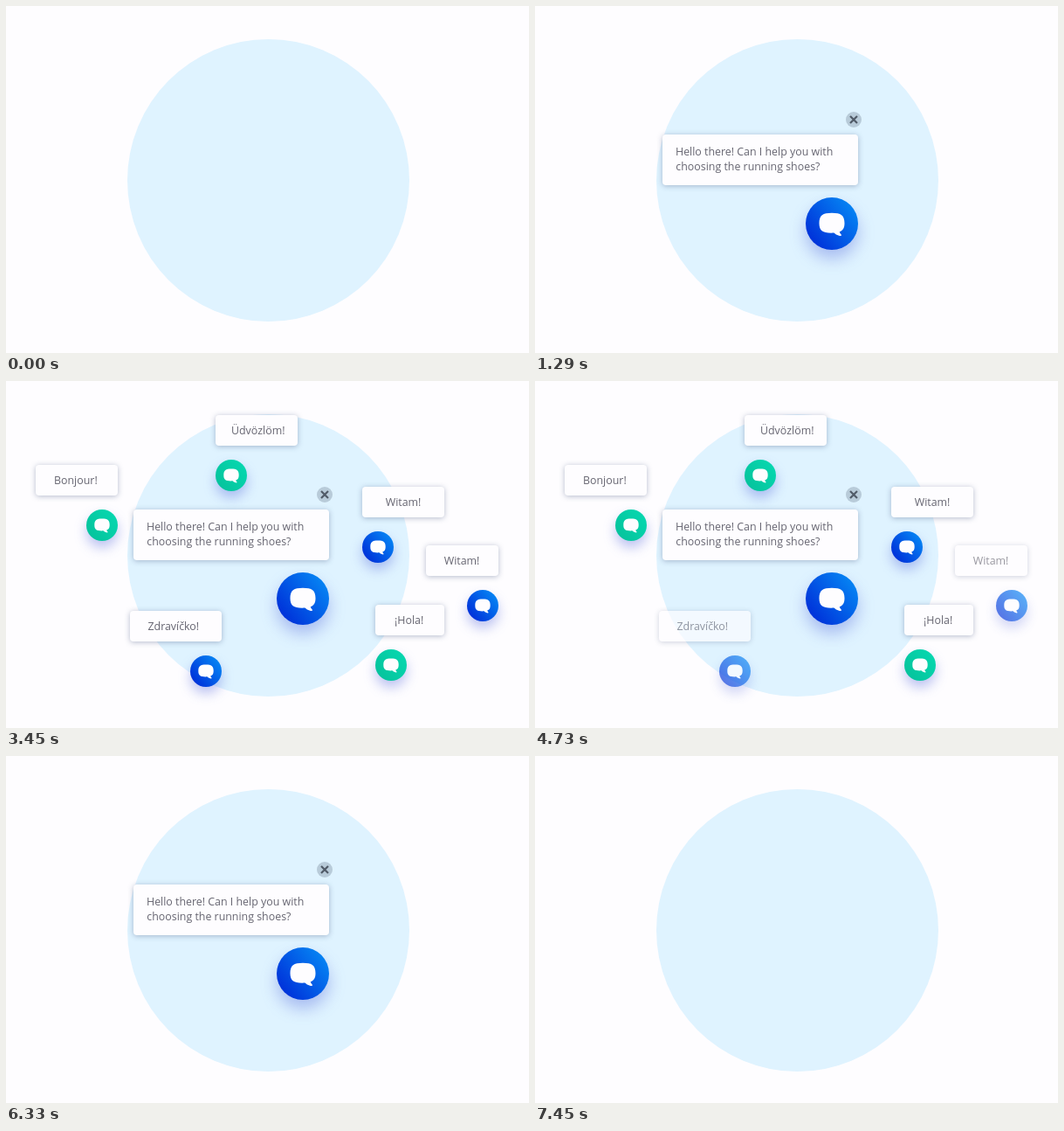
Animation of 599x397 px, one loop 7860 ms. Source, as an HTML page with a canvas:

```html
<!DOCTYPE html>
<html lang="en">
<head>
<meta charset="utf-8">
<title>Chat greetings</title>
<style>
  html, body { margin: 0; width: 100%; height: 100%; overflow: hidden; background: #fefdff; }
  canvas { display: block; }
</style>
</head>
<body>
<canvas id="stage" width="599" height="397"></canvas>
<script>
const LOOP = 7860, STEP = 80, FIRST_STEP = 10, FADE = 500, RISE = 55;
const BLUE = ['#0034da', '#0580f2'];
const GREEN = ['#06c49d', '#06d6ae'];

const stage = document.getElementById('stage');
const view = stage.getContext('2d');
const layer = document.createElement('canvas');
layer.width = stage.width;
layer.height = stage.height;
const ctx = layer.getContext('2d');

// Each greeting: start time, card x, card top, card width, text x, button x, colours
const greetings = [
  { text: 'Bonjour!',   start: 1530, x: 34,  y: 96,  w: 94,  textX: 55,    button: 110, colors: GREEN },
  { text: 'Witam!',     start: 1530, x: 408, y: 121, w: 94,  textX: 434.7, button: 426, colors: BLUE },
  { text: 'Üdvözlöm!',  start: 2170, x: 240, y: 39,  w: 94,  textX: 258,   button: 258, colors: GREEN },
  { text: '¡Hola!',     start: 2170, x: 423, y: 256, w: 79,  textX: 445,   button: 441, colors: GREEN },
  { text: 'Witam!',     start: 2850, x: 481, y: 188, w: 83,  textX: 501.7, button: 546, colors: BLUE },
  { text: 'Zdravíčko!', start: 2850, x: 142, y: 263, w: 105, textX: 162.5, button: 229, colors: BLUE }
];

function disc(c, x, y, r, fill) {
  c.fillStyle = fill;
  c.beginPath();
  c.arc(x, y, r, 0, Math.PI * 2);
  c.fill();
}

function shadow(color, blur, dy) {
  ctx.shadowColor = color;
  ctx.shadowBlur = blur;
  ctx.shadowOffsetY = dy;
}

function card(x, y, w, h) {
  ctx.save();
  shadow('rgba(60, 80, 120, 0.38)', 6, 1);
  ctx.fillStyle = '#fefdff';
  ctx.beginPath();
  ctx.roundRect(x, y, w, h, 4);
  ctx.fill();
  ctx.restore();
}

function label(text, x, y) {
  ctx.font = '12.4px "Open Sans", "Noto Sans", sans-serif';
  ctx.fillStyle = '#666571';
  ctx.fillText(text, x, y);
}

function button(x, y, r, colors) {
  const k = r / 30;
  const gradient = ctx.createLinearGradient(x - r * 0.75, y + r * 0.6, x + r * 0.75, y - r * 0.6);
  colors.forEach((color, i) => gradient.addColorStop(i, color));
  ctx.save();
  shadow('rgba(70, 90, 215, 0.36)', 8 + 10 * k, 4 + 6 * k);
  disc(ctx, x, y, r, gradient);
  ctx.restore();

  ctx.save();
  ctx.translate(x, y);
  ctx.scale(k, k);
  ctx.fillStyle = '#fefdff';
  ctx.beginPath();
  ctx.moveTo(0, -12.3);
  ctx.bezierCurveTo(10.5, -12.3, 14.5, -9.5, 14.5, -0.5);
  ctx.bezierCurveTo(14.5, 5, 12.5, 8, 8.8, 9.3);
  ctx.quadraticCurveTo(9.3, 11.8, 11.2, 13.2);
  ctx.quadraticCurveTo(10.6, 14.4, 8.2, 13.8);
  ctx.quadraticCurveTo(4.5, 12.8, 2.4, 10.6);
  ctx.bezierCurveTo(-10, 11.2, -14.5, 8.5, -14.5, -0.5);
  ctx.bezierCurveTo(-14.5, -9.5, -10.5, -12.3, 0, -12.3);
  ctx.fill();
  ctx.restore();
}

function closeIcon(x, y) {
  disc(ctx, x, y, 9, '#b8cbd9');
  ctx.strokeStyle = '#505a67';
  ctx.lineWidth = 2.2;
  ctx.beginPath();
  for (const side of [-1, 1]) {
    ctx.moveTo(x - 4 * side, y - 4);
    ctx.lineTo(x + 4 * side, y + 4);
  }
  ctx.stroke();
}

function question() {
  card(146, 147, 224, 58);
  label('Hello there! Can I help you with', 161, 171);
  label('choosing the running shoes?', 161.3, 188);
  closeIcon(365, 130);
}

function greeting(g) {
  card(g.x, g.y, g.w, 35);
  label(g.text, g.textX, g.y + 22);
  button(g.button, g.y + 69, 18, g.colors);
}

function progress(time, start) {
  const p = Math.min(1, Math.max(0, (time - start) / FADE));
  return p < 0.5 ? 4 * p ** 3 : 1 - 4 * (1 - p) ** 3;
}

// Draws a group on the spare layer, then blends it in as one picture
function reveal(amount, rise, draw) {
  if (amount <= 0) return;
  ctx.clearRect(0, 0, layer.width, layer.height);
  draw();
  view.globalAlpha = amount;
  view.drawImage(layer, 0, Math.round(rise * (1 - amount)));
  view.globalAlpha = 1;
}

function render(time) {
  const stepped = FIRST_STEP + STEP * Math.floor((time - FIRST_STEP) / STEP);
  // The second half plays the first half backwards
  const t = Math.min(stepped, LOOP - stepped);

  view.fillStyle = '#fefdff';
  view.fillRect(0, 0, stage.width, stage.height);
  disc(view, 300.5, 199.5, 161.5, '#dff3ff');

  reveal(progress(t, 450), RISE, () => button(340, 249, 30, BLUE));
  reveal(progress(t, 730), RISE, question);
  for (const g of greetings) reveal(progress(t, g.start), 0, () => greeting(g));
}

let begin;
function tick(now) {
  begin ??= now;
  render((now - begin) % LOOP);
  requestAnimationFrame(tick);
}
render(0);
requestAnimationFrame(tick);
</script>
</body>
</html>
```
